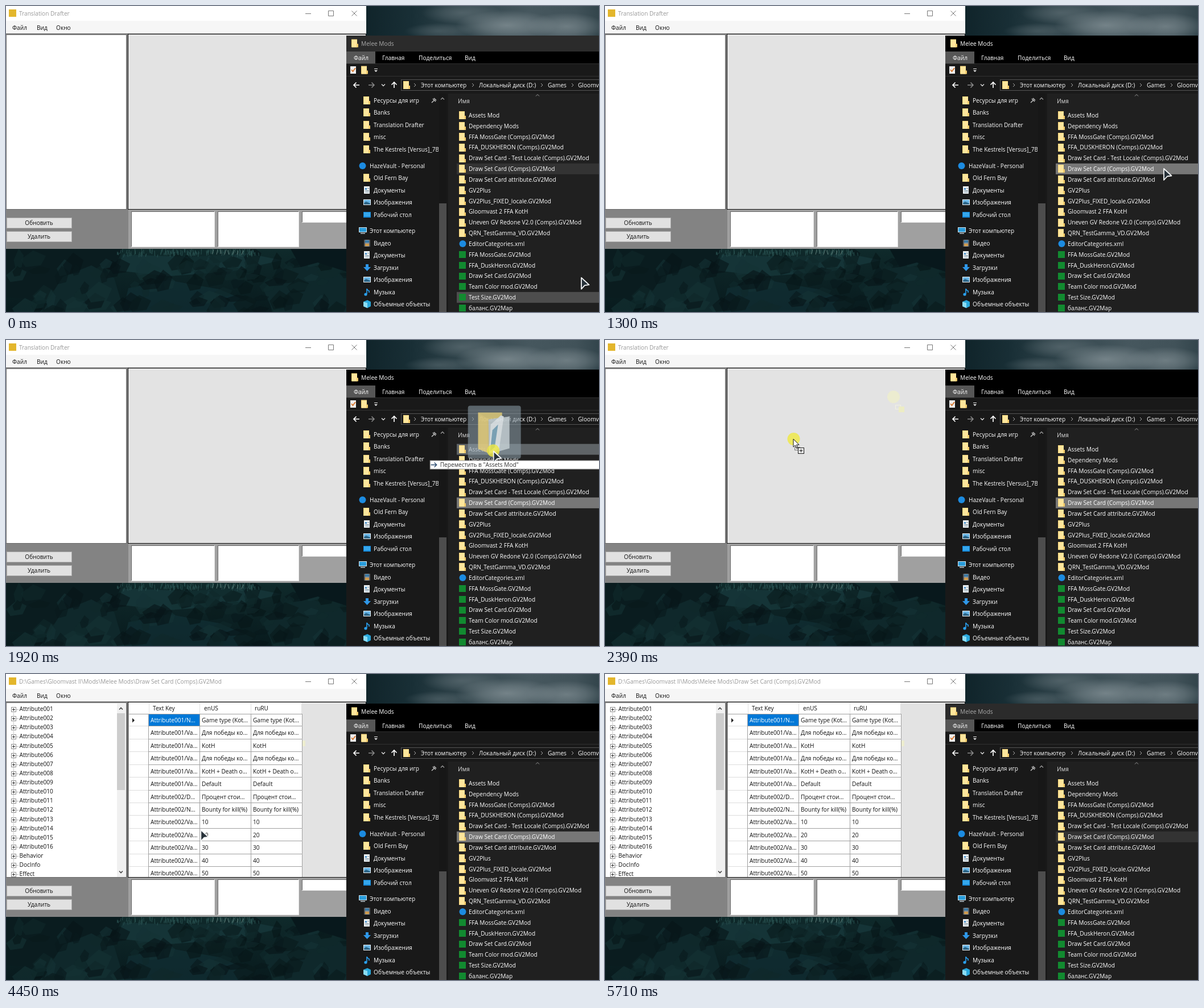
Animation of 1042 by 538 pixels, one loop 5780 ms. Source, as an HTML page:

```html
<!DOCTYPE html>
<html lang="ru">
<head>
<meta charset="utf-8">
<title>Drag and drop</title>
<style>
html, body { margin: 0; width: 100%; height: 100%; overflow: hidden; background: #0b1c20; }
svg { display: block; width: 1042px; height: 538px; }
text { font: 500 10.15px "Open Sans", "Noto Sans", sans-serif; white-space: pre; }
</style>
</head>
<body>
<svg id="stage" viewBox="0 0 1042 538" xmlns="http://www.w3.org/2000/svg"></svg>
<script>
const LOOP = 5780;
const stage = document.getElementById('stage');

// Drawing helpers; text is placed by the middle of its line
const rect = (x, y, w, h, fill, extra = '') =>
  `<rect x="${x}" y="${y}" width="${w}" height="${h}" fill="${fill}" ${extra}/>`;
const box = (x, y, w, h, fill, stroke) => rect(x + .5, y + .5, w - 1, h - 1, fill, `stroke="${stroke}"`);
const text = (x, y, s, fill = '#fff', extra = '') =>
  `<text x="${x}" y="${y + 3.7}" fill="${fill}" ${extra}>${s}</text>`;
const line = (d, stroke, w = 1) => `<path d="${d}" fill="none" stroke="${stroke}" stroke-width="${w}"/>`;
const shape = (d, fill, extra = '') => `<path d="${d}" fill="${fill}" ${extra}/>`;
const disc = (x, y, r, fill) => `<circle cx="${x}" cy="${y}" r="${r}" fill="${fill}"/>`;
const group = (id, body, extra = '') => `<g id="${id}" ${extra}>${body}</g>`;
const caret = (x, y, dir, color, w = 1.4) => line(`M${x - 3} ${y + 1.5 * dir}l3 ${-3 * dir}l3 ${3 * dir}`, color, w);
const sunken = (x, y, w, h) => rect(x, y, w, h, '#e3e3e3') + rect(x, y, w - 1, h - 1, '#696969') + rect(x + 1, y + 1, w - 2, h - 2, '#fff');

const icons = {
  folder: (x, y) => rect(x, y - 7, 10, 14, '#f7d67c') + rect(x + 1, y - 6, 9, 13, '#ffe69c') + rect(x + 9, y + 1, 3, 6, '#f2cc6c'),
  doc: (x, y) => rect(x + 1, y - 7, 10, 13, '#eef3f6') + rect(x + 3, y - 4, 3, 3, '#4b91c8') +
    line(`M${x + 7} ${y - 3.5}h3M${x + 3} ${y + .5}h7M${x + 3} ${y + 3}h7`, '#6e8796'),
  image: (x, y) => rect(x, y - 5, 13, 10, '#eef5fa') + rect(x + 1, y - 4, 11, 8, '#66b3e4') +
    shape(`M${x + 1} ${y + 4}v-3l4-2 7 3v2z`, '#2c6587'),
  desktop: (x, y) => rect(x, y - 5, 13, 10, '#1588d8') + rect(x + 1, y - 4, 11, 7, '#35a7ec'),
  pc: (x, y) => rect(x, y - 6, 14, 9, '#d7e7ef') + rect(x + 1, y - 5, 12, 7, '#2a9ddb') + rect(x + 3, y + 4, 8, 1.5, '#bcc9d0'),
  film: (x, y) => rect(x + 1, y - 6, 11, 12, '#8b9298') + rect(x + 3, y - 5, 7, 4, '#3879a6') + rect(x + 3, y + 1, 7, 4, '#d29b4a') +
    line(`M${x + 2} ${y - 6}v12M${x + 11} ${y - 6}v12`, '#222'),
  down: (x, y) => shape(`M${x + 4} ${y - 6}h5v5h4l-6.5 7-6.5-7h4z`, '#2f97e8'),
  note: (x, y) => line(`M${x + 6} ${y + 3}v-9q1 3 4 4v3`, '#2aa0f0', 1.6) + disc(x + 4, y + 4, 2.6, '#2aa0f0'),
  cube: (x, y) => shape(`M${x} ${y - 4}l7-3 6 3v8l-6 3-7-3z`, '#29a8dc') + shape(`M${x} ${y - 4}l7 2v9l-7-3z`, '#8cdcf4'),
  blob: (x, y) => disc(x + 6.5, y, 6, '#1c8be0'),
  square: (x, y) => rect(x, y - 6, 12, 12, '#128a30'),
};

const PACK = 'Draw Set Card (Comps).GV2Mod';
const files = ['Assets Mod', 'Dependency Mods', 'FFA MossGate (Comps).GV2Mod', 'FFA_DUSKHERON (Comps).GV2Mod',
  'Draw Set Card - Test Locale (Comps).GV2Mod', PACK, 'Draw Set Card attribute.GV2Mod', 'GV2Plus',
  'GV2Plus_FIXED_locale.GV2Mod', 'Gloomvast 2 FFA KotH', 'Uneven GV Redone V2.0 (Comps).GV2Mod',
  'QRN_TestGamma_VD.GV2Mod', 'EditorCategories.xml', 'FFA MossGate.GV2Mod', 'FFA_DuskHeron.GV2Mod',
  'Draw Set Card.GV2Mod', 'Team Color mod.GV2Mod', 'Test Size.GV2Mod', 'баланс.GV2Map'];
const FOLDERS = 12, SELECTED = 5;
const rowY = i => 192.2 + 18.83 * i;

const nav = [
  [166, 'folder', 'Ресурсы для игр'], [187, 'folder', 'Banks'], [209, 'folder', 'Translation Drafter'],
  [230, 'folder', 'misc'], [252, 'folder', 'The Kestrels [Versus]_7B'], [281, 'blob', 'HazeVault - Personal', 1],
  [302, 'folder', 'Old Fern Bay'], [324, 'doc', 'Документы'], [345, 'image', 'Изображения'],
  [367, 'desktop', 'Рабочий стол'], [395, 'pc', 'Этот компьютер', 1], [417, 'film', 'Видео'],
  [438, 'doc', 'Документы'], [460, 'down', 'Загрузки'], [481, 'image', 'Изображения'],
  [503, 'note', 'Музыка'], [524, 'cube', 'Объемные объекты']];

function seeded(seed) {
  return () => (seed = (seed * 16807) % 2147483647) / 2147483647;
}

function wallpaper() {
  const stops = list => list.map(([o, c, a = 1]) => `<stop offset="${o}" stop-color="${c}" stop-opacity="${a}"/>`).join('');
  const random = seeded(71);
  let rocks = '', grass = '';
  for (let i = 0; i < 110; i++) {
    const x = random() * 600, y = 440 + random() * 98, w = 14 + random() * 34, h = 6 + random() * 16;
    const tone = ['#071518', '#09191c', '#0f292b', '#143235'][Math.floor(random() * 4)];
    rocks += shape(`M${x} ${y}l${w * .5} ${-h}l${w * .5} ${h * .6}l${-w * .2} ${h}l${-w * .6} ${h * .2}z`, tone, 'opacity=".6"');
  }
  for (let i = 0; i < 130; i++)
    grass += `M${195 + random() * 250} ${433 + random() * 9}l${random() * 4 - 2} ${-4 - random() * 6}`;
  const clouds = [[800, 12, 70, 20, .35], [880, 34, 90, 26, .7], [985, 36, 70, 24, .6], [760, 44, 60, 14, .3]];
  return `<defs>
    <linearGradient id="sky">${stops([[0, '#10242a'], [.2, '#192f36'], [.45, '#34474e'], [.7, '#46575e'], [.9, '#415259'], [1, '#33454c']])}</linearGradient>
    <radialGradient id="cloud">${stops([[0, '#8b989d'], [.5, '#8b989d', .6], [1, '#8b989d', 0]])}</radialGradient>
    <linearGradient id="ground" x2="0" y2="1">${stops([[0, '#0f2a2b'], [.35, '#0d2426'], [1, '#081a1d']])}</linearGradient>
    <clipPath id="grid"><rect x="216" y="50" width="382" height="307"/></clipPath>
    <clipPath id="tree"><rect x="1" y="52" width="194" height="305"/></clipPath>
    <clipPath id="navClip"><rect x="598" y="154" width="162" height="384"/></clipPath></defs>`
    + rect(632, 0, 410, 53, 'url(#sky)')
    + clouds.map(([x, y, rx, ry, a]) => `<ellipse cx="${x}" cy="${y}" rx="${rx}" ry="${ry}" fill="url(#cloud)" opacity="${a}"/>`).join('')
    + rect(0, 427, 600, 111, 'url(#ground)')
    + shape('M0 427h205l-12 30-30 22-40 4-30 35-93-6z', '#0a1c1f')
    + shape('M205 437l120 4 100-6 60 12-90 20-110 8-90-10z', '#153437')
    + shape('M60 538l40-62 50-20 40 22 18 60zM470 538l-18-40 34-34 50-8 64 20v62z', '#0f282b')
    + shape('M215 496l70-14 90 16 60 26-20 14h-210z', '#123036', 'opacity=".7"')
    + rocks
    + shape('M500 427h98v40l-50-16-30 8z', '#08181c')
    + line(grass, '#28504f')
    + line('M362 436l3-8m5 9l2-9m6 8l-1-7m7 8l3-9m5 9l-2-8m8 8l3-8m5 8l2-7m6 7l3-7', '#5c7874');
}

function editor() {
  let s = rect(0, 0, 633, 427, '#a0a0a0') + rect(0, 0, 633, 26, '#fff') + rect(0, 26, 633, 22, '#f6f6f6')
    + rect(0, 48, 215, 379, '#838383') + rect(5, 6, 13, 13, '#e3b62c')
    + line('M526 13.5h10M566.5 8.5h9v9h-9zM607.5 8.5l9 9m0-9l-9 9', '#777')
    + text(11, 38, 'Файл', '#111') + text(54, 38, 'Вид', '#111') + text(88, 38, 'Окно', '#111')
    + box(0, 50, 212, 308, '#fff', '#696969')
    + box(214, 49, 419, 309, '#e3e3e3', '#111');
  for (const [y, label] of [[372, 'Обновить'], [396, 'Удалить']])
    s += box(1, y, 115, 19, '#e1e1e1', '#adadad') + text(58, y + 9.7, label, '#111', 'text-anchor="middle"');
  s += sunken(220, 361, 147, 63) + sunken(372, 361, 143, 63) + sunken(520, 361, 90, 20);
  s += text(23, 13, 'Translation Drafter', '#999', 'id="titleIdle"')
    + text(23, 13, 'D:\\Games\\Gloomvast II\\Mods\\Melee Mods\\' + PACK, '#999', 'id="titleOpen"');
  return s + group('smudge', rect(520, 117, 6, 10, '#ededcf'))
    + group('echo', disc(507, 100, 11, '#ececd0') + box(510, 114, 10, 8, 'none', '#f2f2e0') + rect(516, 117, 10, 10, '#ececc4'))
    + group('loaded', treeBar() + group('treeRows', tree(), 'clip-path="url(#tree)"') + group('table', table(), 'clip-path="url(#grid)"'));
}

function treeBar() {
  return rect(195, 52, 15, 305, '#f0f0f0') + rect(195, 69, 14, 135, '#cdcdcd')
    + caret(202, 61, 1, '#444', 1.6) + caret(202, 348, -1, '#444', 1.6);
}

function tree() {
  const names = Array.from({ length: 16 }, (_, i) => 'Attribute' + String(i + 1).padStart(3, '0'))
    .concat('Behavior', 'DocInfo', 'Effect');
  return '<path d="M13.5 60V357" stroke="#999" stroke-dasharray="1 1"/>' + names.map((name, i) => {
    const y = Math.round(61 + 16.13 * i);
    return box(9, y - 3, 9, 9, '#fff', '#919191') + line(`M11 ${y + 1.5}h5M13.5 ${y - 1}v5`, '#333')
      + line(`M18 ${y + 1.5}h4`, '#bbb') + text(23.5, y, name, '#111');
  }).join('');
}

function table() {
  const both = ['Game type (Kot...', 'Для победы ко...', 'KotH', 'Для победы ко...', 'KotH + Death o...', 'Default',
    'Процент стои...', 'Bounty for kill(%)', '10', '20', '30', '40', '50'];
  const tail = i => i === 0 || i === 7 ? 'N' : i === 6 ? 'D' : 'Va';
  const left = [251, 341, 431];
  let s = rect(216, 50, 304, 21, '#fff') + line('M251.5 50v20M340.5 50v20M430.5 50v20M519.5 50v20', '#e2e2e2')
    + ['Text Key', 'enUS', 'ruRU'].map((h, c) => text([258, 348, 437][c], 60, h, '#111')).join('');
  both.forEach((value, i) => {
    const top = Math.round(70 + 22.42 * i), bottom = Math.round(70 + 22.42 * (i + 1)), h = bottom - top;
    const key = `Attribute00${i < 6 ? 1 : 2}/${tail(i)}...`;
    [key, value, value].forEach((label, c) => {
      const chosen = i === 0 && c === 0;
      let body = rect(left[c], top, 90, h, chosen ? '#0078d7' : '#fff')
        + line(`M${left[c] - .5} ${top}V${bottom}M${left[c]} ${bottom - .5}h89.5V${top}`, '#a0a0a0')
        + text(left[c] + 3, top + 11.3, label, chosen ? '#fff' : '#111');
      if (c === 0) body = rect(216, top, 35, h, '#fff') + line(`M216 ${bottom - .5}h35`, '#ddd') + body;
      if (chosen) body += shape('M222 77.5l4 4-4 4z', '#222');
      s += `<g class="cell">${body}</g>`;
    });
  });
  return s + line('M216 70.5h304', '#a0a0a0');
}

function explorer() {
  let s = rect(598, 52, 444, 486, '#191919') + rect(598, 52, 444, 28, '#2b2b2b', 'id="caption"') + icons.folder(607, 65.5)
    + text(624, 66, 'Melee Mods', '#fff', 'id="captionText"')
    + rect(598, 80, 444, 21, '#000') + rect(598, 80, 51, 21, '#565656');
  [[611, 'Файл'], [661, 'Главная'], [725, 'Поделиться'], [806, 'Вид']].forEach(([x, label]) => s += text(x, 91, label));
  s += line('M598 101.5h444M598 123.5h444', '#303030')
    + rect(605, 106, 10, 13, '#eee') + line('M607 112l2.5 3 4.5-6', '#d9762b', 1.8) + icons.folder(624, 112.5)
    + line('M647 110.5h6', '#eee') + shape('M647 113h6l-3 3z', '#eee')
    + line('M621 139h-10m4.5-4.5l-4.5 4.5 4.5 4.5', '#fff', 1.7)
    + line('M637 139h10m-4.5-4.5l4.5 4.5-4.5 4.5', '#8a8a8a', 1.5)
    + caret(663, 139, -1, '#ddd') + line('M682 144v-10m-4.5 4.5l4.5-4.5 4.5 4.5', '#fff', 1.7)
    + box(694, 129, 360, 20, '#191919', '#555') + icons.folder(698, 139);
  for (const x of [718, 820, 941, 995]) s += line(`M${x - 1} 136l3 3-3 3`, '#aaa');
  [[729, 'Этот компьютер'], [831, 'Локальный диск (D:)'], [952, 'Games'], [1005, 'Gloomvast II']].forEach(([x, label]) => s += text(x, 139, label));

  s += group('nav', nav.map(([y, icon, label, root]) =>
    icons[icon](root ? 620 : 628, y) + text(root ? 639 : 646, y, label)).join(''), 'clip-path="url(#navClip)"')
    + line('M748 170l4-4m-2-3l5 5m-3-6l4 4', '#bbb', 1.6)
    + rect(761, 154, 13, 384, '#171717') + rect(761, 347, 13, 191, '#4d4d4d') + caret(767, 163, 1, '#999')
    + rect(777, 154, 265, 384, '#202020') + caret(934, 157, 1, '#999', 1)
    + text(794, 167, 'Имя', '#ddd')
    + rect(792, rowY(SELECTED) - 9.5, 250, 19, '#333', 'id="selection"') + rect(792, 0, 250, 19, '#4d4d4d', 'id="hover"');
  files.forEach((name, i) => {
    const icon = i < FOLDERS ? 'folder' : i === FOLDERS ? 'blob' : 'square';
    s += icons[icon](796, Math.round(rowY(i))) + text(813, rowY(i), name);
  });
  return s;
}

function pointer() {
  const preview = rect(-44, -79, 93, 93, '#8b9ba5', 'rx="4" opacity=".58"')
    + '<g opacity=".85">' + shape('M-26-67h42v62h-42z', '#dcc878')
    + shape('M-8-55l37-5v56l-36 10z', '#c3cdd1') + shape('M-4-46l18-16 5 2-8 56-18 9z', '#e6ecee')
    + shape('M-1-36l10-10-6 40-8 7z', '#7fabc0') + shape('M-26-67l17 11v60l-17-7z', '#e6cf7c') + '</g>';
  const tip = box(-111, 17, 320, 16, '#fff', '#999') + line('M-109 25h10m-4-4l4 4-4 4', '#24466b', 1.3)
    + text(-93, 25, '', '#333', 'id="tipText"');
  return group('pointer',
    group('preview', preview) + group('tip', tip) + group('press', disc(.5, 0, 11, '#efe83e'), 'opacity=".8"')
    + group('arrow', shape('M1 1L14.5 13.5 7 14.5 1 21z', '#273139', 'stroke="#f2f4f5" stroke-width="1.8" stroke-linejoin="round"'))
    + group('copy', shape('M0 0v14l3.3-3 2.5 5.5 2.2-1-2.5-5.3h4.5z', '#fff', 'stroke="#111"')
      + rect(2.5, 14.5, 9, 5, 'none', 'stroke="#111" stroke-dasharray="1 1"')
      + box(8, 15, 11, 11, '#fff', '#111') + line('M10.5 20.5h6M13.5 17.5v6', '#111')));
}

stage.innerHTML = wallpaper() + editor() + explorer() + pointer();
const el = Object.fromEntries([...stage.querySelectorAll('[id]')].map(n => [n.id, n]));
const cells = [...stage.querySelectorAll('.cell')];
const show = (node, on) => node.setAttribute('display', on ? 'inline' : 'none');

// Pointer path: time, x, y
const path = [[-120, 1015, 512], [0, 1010, 477], [250, 1001, 395], [450, 989, 315], [640, 982, 288], [800, 981, 285],
  [1300, 981, 285], [1450, 978, 283], [1720, 957, 266], [1860, 908, 226], [2050, 745, 128], [2180, 600, 96],
  [2250, 507, 100], [2320, 410, 133], [2390, 331, 174], [2530, 331, 190], [3000, 331, 205], [3890, 331, 205],
  [4450, 341, 273], [4600, 380, 300], [4850, 540, 420], [5080, 655, 545]];

function position(t) {
  const last = path[path.length - 1];
  if (t >= last[0]) return last.slice(1);
  const i = Math.max(1, path.findIndex(p => p[0] >= t));
  const [a, ax, ay] = path[i - 1], [b, bx, by] = path[i];
  const k = (t - a) / (b - a);
  return [ax + (bx - ax) * k, ay + (by - ay) * k];
}

function rowAt([x, y]) {
  const i = Math.round((y - rowY(0)) / 18.83);
  return x > 792 && i >= 0 && i < files.length ? i : -1;
}

function draw(t) {
  const [x, y] = position(t);
  const active = t >= 950 && t < 5200;
  const dragging = t >= 1500 && t < 2460;
  const pressed = dragging || (t >= 950 && t < 1080) || (t >= 1400 && t < 1500);
  const overEditor = x < 598;
  const loaded = t >= 3260;

  el.caption.setAttribute('fill', active ? '#000' : '#2b2b2b');
  el.captionText.setAttribute('fill', active ? '#fff' : '#aaa');
  el.selection.setAttribute('fill', active ? '#777' : '#333');

  const row = t < 5080 ? rowAt(position(dragging ? t : t - 120)) : -1;
  show(el.hover, row >= 0 && !(active && row === SELECTED));
  if (row >= 0) el.hover.setAttribute('y', rowY(row) - 9.5);
  el.hover.setAttribute('fill', dragging ? '#5f6467' : '#4d4d4d');

  show(el.titleIdle, !loaded);
  show(el.titleOpen, loaded);
  show(el.loaded, loaded);
  show(el.treeRows, t >= 3400);
  const painted = Math.floor((t - 3260) / 4);
  cells.forEach((cell, i) => show(cell, i < painted));
  show(el.echo, t >= 2320 && t < 2530);
  show(el.smudge, t >= 2320);

  el.pointer.setAttribute('transform', `translate(${x.toFixed(1)} ${y.toFixed(1)})`);
  show(el.pointer, t < 5080);
  show(el.press, pressed);
  show(el.preview, dragging && !overEditor);
  show(el.copy, dragging && overEditor);
  show(el.arrow, !(dragging && overEditor));
  const droppable = dragging && row >= 0 && row < FOLDERS && row !== SELECTED;
  show(el.tip, droppable);
  if (droppable) el.tipText.textContent = `Переместить в "${files[row]}"`;
}

const start = performance.now();
function frame() {
  draw((performance.now() - start) % LOOP);
  requestAnimationFrame(frame);
}
draw(0);
requestAnimationFrame(frame);
</script>
</body>
</html>
```
